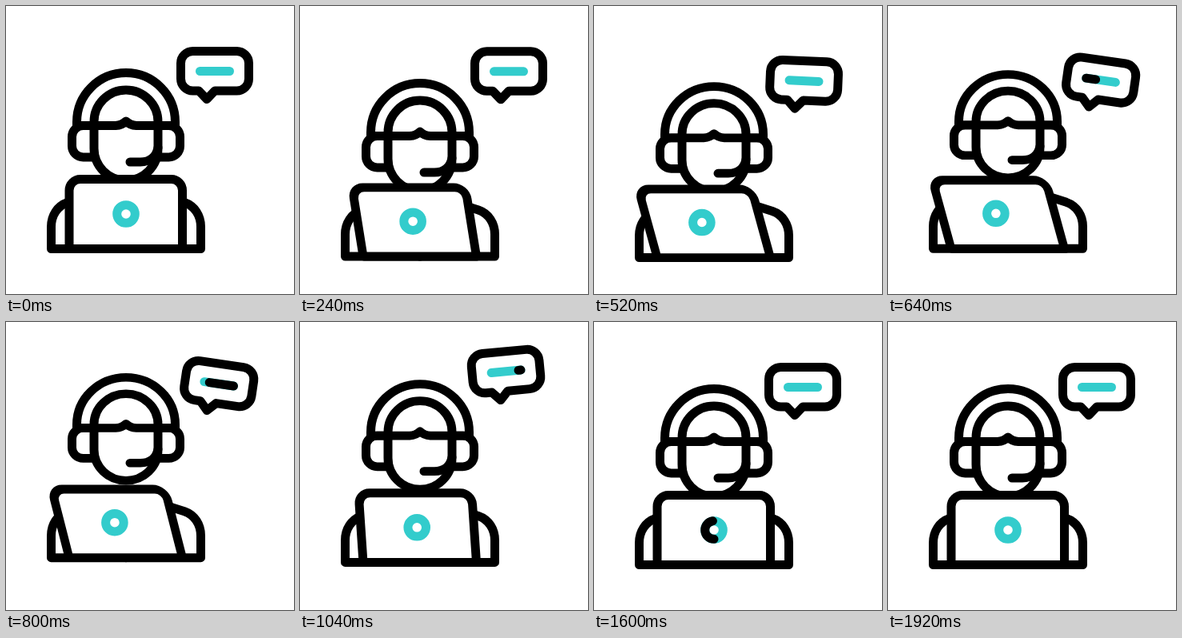
An HTML page that plays this animation: 360x360 px, repeating every 2.04 s.

```html
<!DOCTYPE html>
<html lang="en">
<head>
<meta charset="utf-8">
<title>Support agent</title>
<style>
  html, body { margin: 0; width: 100%; height: 100%; overflow: hidden; background: #fff; }
  svg { display: block; width: 100%; height: 100%; }
  .ink, .accent { fill: none; stroke: #000; stroke-width: 11; stroke-linecap: round; stroke-linejoin: round; }
  .accent { stroke: #33cccc; }
</style>
</head>
<body>
<svg viewBox="0 0 360 360">
  <g id="head" class="ink">
    <path d="M88.5 149V145a61.5 61.5 0 0 1 123 0V149"/>
    <rect x="110" y="105" width="80" height="113" rx="40"/>
    <path d="M92 149.5H137Q145 149 150 144Q155 149 163 149.5H208"/>
    <path id="ear" d="M110 149.5H96.5a14 14 0 0 0-14 14V175a14 14 0 0 0 14 14H110"/>
    <use href="#ear" transform="matrix(-1 0 0 1 300 0)"/>
    <path d="M155 195H168C180 195 188 188 190 177"/>
  </g>
  <g id="body" class="ink">
    <path id="shoulder" d="M110 235L77 245.5C64 250 56.5 262 56.5 276V303.5H150"/>
    <use href="#shoulder" transform="matrix(-1 0 0 1 300 0)"/>
    <path id="laptop" fill="#fff" d="M79 303.5V230.5a14 14 0 0 1 14-14H206.5a14 14 0 0 1 14 14V303.5Z"/>
    <g id="logo">
      <circle class="accent" cx="150" cy="260" r="11.3"/>
      <path id="ringTrace"/>
    </g>
  </g>
  <g id="bubble" class="ink">
    <path d="M233.5 56.5H288.5a15 15 0 0 1 15 15V91a15 15 0 0 1-15 15H261L251 116.5L241 106H233.5a15 15 0 0 1-15-15V71.5a15 15 0 0 1 15-15Z"/>
    <path class="accent" d="M242.5 81.5H279.5"/>
    <path id="barTrace"/>
  </g>
</svg>
<script>
const LOOP = 2040, STEP = 40;
const el = id => document.getElementById(id);

// Eased 0 to 1 between two times
function ramp(t, from, to) {
  const u = Math.min(1, Math.max(0, (t - from) / (to - from)));
  return (1 - Math.cos(Math.PI * u)) / 2;
}

// Rises, holds and returns to 0
const pulse = (t, start, top, leave, end) => ramp(t, start, top) - ramp(t, leave, end);

// Swings from 0 to one extreme, over to the other, and back to rest
function swing(t, start, first, second, rise = 360, cross = 440) {
  const peak = start + rise, low = peak + cross;
  return first * ramp(t, start, peak)
    + (second - first) * ramp(t, peak, low)
    - second * ramp(t, low, low + 800 - cross);
}

function trace(id, start, end, pathOf) {
  el(id).setAttribute("d", end - start > 0.001 ? pathOf(start, end) : "");
}

function barPath(a, b) {
  const x = u => 242.5 + 37 * u;
  return `M${x(a)} 81.5H${x(b)}`;
}

function ringPath(a, b) {
  const point = u => {
    const angle = 2 * Math.PI * u;
    return `${150 + 11.3 * Math.sin(angle)} ${260 - 11.3 * Math.cos(angle)}`;
  };
  const arc = u => `A11.3 11.3 0 0 1 ${point(u)}`;
  return `M${point(a)}${arc((a + b) / 2)}${arc(b)}`;
}

function render(t) {
  const move = (id, transform) => el(id).setAttribute("transform", transform);

  const headY = swing(t, 40, 22.3, -17.8);
  const squash = 0.042 * pulse(t, 240, 720, 720, 1360);
  const bodyY = swing(t, 40, 16.2, -8.8, 360, 400);
  const lean = 0.27 * pulse(t, 40, 400, 720, 1200);
  const bubbleY = swing(t, 200, 12, -19.5);
  const tilt = swing(t, 420, 9.8, -8.5, 300);

  move("head", `translate(0 ${149 + headY}) scale(1 ${1 - squash}) translate(0 -149)`);
  move("body", `translate(0 ${bodyY})`);
  move("laptop", `translate(0 303.5) matrix(1 0 ${lean} ${1 - 0.06 * lean} 0 0) translate(0 -303.5)`);
  move("logo", `translate(${-56 * lean} ${-2 * lean})`);
  move("bubble", `translate(0 ${bubbleY}) rotate(${tilt} 251 118)`);

  trace("barTrace", ramp(t, 680, 1120), ramp(t, 540, 800), barPath);
  trace("ringTrace", ramp(t, 1320, 1880), ramp(t, 1220, 1640), ringPath);
}

function tick(now) {
  render(Math.floor((now % LOOP) / STEP) * STEP);
  requestAnimationFrame(tick);
}
render(0);
requestAnimationFrame(tick);
</script>
</body>
</html>
```
